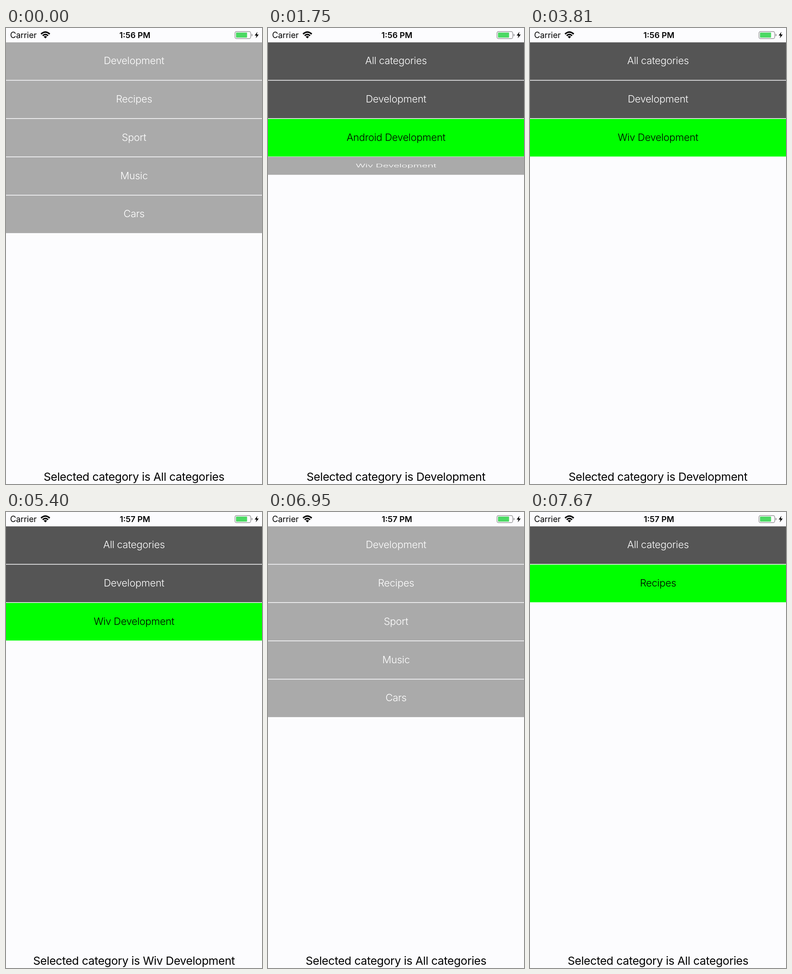
Animation, 561 px wide and 998 px high, one loop 8 s. Source, as an HTML page:

```html
<!DOCTYPE html>
<html lang="en">
<head>
<meta charset="utf-8">
<title>Category list</title>
<style>
html, body { margin: 0; width: 100%; height: 100%; overflow: hidden; background: #fcfcfe; }
body { position: relative; font-family: Inter, Roboto, sans-serif; color: #000; }
#bar { position: absolute; left: 0; top: 0; }
#carrier, #clock, #label { position: absolute; white-space: nowrap; }
#carrier { left: 9px; top: 5px; font-size: 18px; line-height: 22px; letter-spacing: -.1px; }
#clock { left: 0; width: 565px; top: 5px; text-align: center; font-size: 17.8px; line-height: 22px; font-weight: 600; }
#label { left: 0; width: 561px; top: 967px; text-align: center; font-size: 24.9px; line-height: 31px; letter-spacing: -.35px; }
/* the list is laid out in points on a 375 point wide screen */
#list { position: absolute; left: 0; top: 0; width: 375px; transform: scale(1.4963); transform-origin: 0 0; }
.row { position: absolute; left: 0; top: 0; width: 375px; height: 56px; transform-origin: 0 0; }
.row div { position: absolute; left: 0; right: 0; top: 1px; height: 55px; line-height: 55px;
  text-align: center; font-size: 14.7px; font-weight: 300; letter-spacing: -.17px; }
.light div { background: #aaa; color: #fff; }
.dark div { background: #555; color: #fff; }
.green div { background: #0f0; color: #000; }
</style>
</head>
<body>
<div id="carrier">Carrier</div>
<div id="clock"></div>
<svg id="bar" width="561" height="30">
  <g fill="none" stroke="#000" stroke-width="3.2">
    <path d="M76.8 13.2Q86.3 4.6 95.8 13.2"/>
    <path d="M80.4 16.9Q86.3 11.5 92.2 16.9"/>
  </g>
  <path d="M82.6 19.1Q86.3 15.8 90 19.1L86.3 22.8Z"/>
  <rect x="501.7" y="7.7" width="34.6" height="15.6" rx="3.6" fill="none" stroke="#98989a" stroke-width="1.4"/>
  <rect x="504" y="10" width="24.3" height="11" rx="1.2" fill="#4cd964"/>
  <path d="M538 12.6q2.3 .6 2.3 2.9t-2.3 2.9z" fill="#98989a"/>
  <path d="M551 8.2L545 16.4H549L547.4 22.6L553.8 14.2H549.6Z"/>
</svg>
<div id="list"></div>
<div id="label"></div>
<script>
const LOOP = 8000, TOP = 20, PITCH = 56;
const ALL = 'All categories', DEV = 'Development', REC = 'Recipes',
      AND = 'Android Development', WIV = 'Wiv Development';
const rest = ['Sport', 'Music', 'Cars'];

const row = (name, style, from = 1, to = from) => ({ name, style, from, to });
const light = (names, from, to) => names.map(n => row(n, 'light', from, to));

// shown at, moves from, moves until, rows from top to bottom
const phases = [
  [0, 0, 1, light([DEV, REC, ...rest], 1)],
  [50, 50, 389, [row(DEV, 'green'), ...light([REC, ...rest], 1, 0)]],
  [389, 389, 720, [row(ALL, 'dark', 0, 1), row(DEV, 'green'), ...light([AND, WIV], 0, 1)]],
  [1540, 1581, 1911, [row(ALL, 'dark'), row(DEV, 'dark'), row(AND, 'green'), row(WIV, 'light', 1, 0)]],
  [2550, 2550, 2880, [row(ALL, 'dark'), row(DEV, 'green'), row(AND, 'light'), row(WIV, 'light', 0, 1)]],
  [3480, 3480, 3810, [row(ALL, 'dark'), row(DEV, 'dark'), row(AND, 'light', 1, 0), row(WIV, 'green')]],
  [5450, 5465, 5804, [row(ALL, 'dark', 1, 0), row(DEV, 'light'), row(WIV, 'green', 1, 0)]],
  [5804, 5804, 6130, [row(DEV, 'light'), ...light([REC, ...rest], 0, 1)]],
  [7000, 7000, 7340, [row(DEV, 'light', 1, 0), row(REC, 'green'), ...light(rest, 1, 0)]],
  [7340, 7340, 7670, [row(ALL, 'dark', 0, 1), row(REC, 'green')]]
];
const labels = [[0, ALL], [1490, DEV], [2520, AND], [3450, DEV], [5400, WIV], [6950, ALL]];
const clocks = [[0, '1:56 PM'], [5400, '1:57 PM']];

const $ = id => document.getElementById(id);
const rows = {};
for (const name of [ALL, DEV, AND, WIV, REC, ...rest]) {
  const el = rows[name] = document.createElement('div');
  el.innerHTML = `<div>${name}</div>`;
  $('list').append(el);
}

const current = (table, t) => table.filter(e => e[0] <= t).pop();
const ease = p => p * p * (3 - 2 * p);
const setText = (el, s) => { if (el.textContent !== s) el.textContent = s; };

function draw(t) {
  const [, start, end, items] = current(phases, t);
  const p = ease(Math.min(1, Math.max(0, (t - start) / (end - start))));
  for (const name in rows) rows[name].style.display = 'none';
  let y = TOP;
  for (const { name, style, from, to } of items) {
    const scale = from + (to - from) * p, el = rows[name];
    if (scale < .005) continue;
    el.className = 'row ' + style;
    el.style.display = 'block';
    el.style.transform = `translateY(${y}px) scaleY(${scale})`;
    y += PITCH * scale;
  }
  setText($('label'), 'Selected category is ' + current(labels, t)[1]);
  setText($('clock'), current(clocks, t)[1]);
}

const begin = performance.now();
function tick() {
  draw((performance.now() - begin) % LOOP);
  requestAnimationFrame(tick);
}
tick();
</script>
</body>
</html>
```
